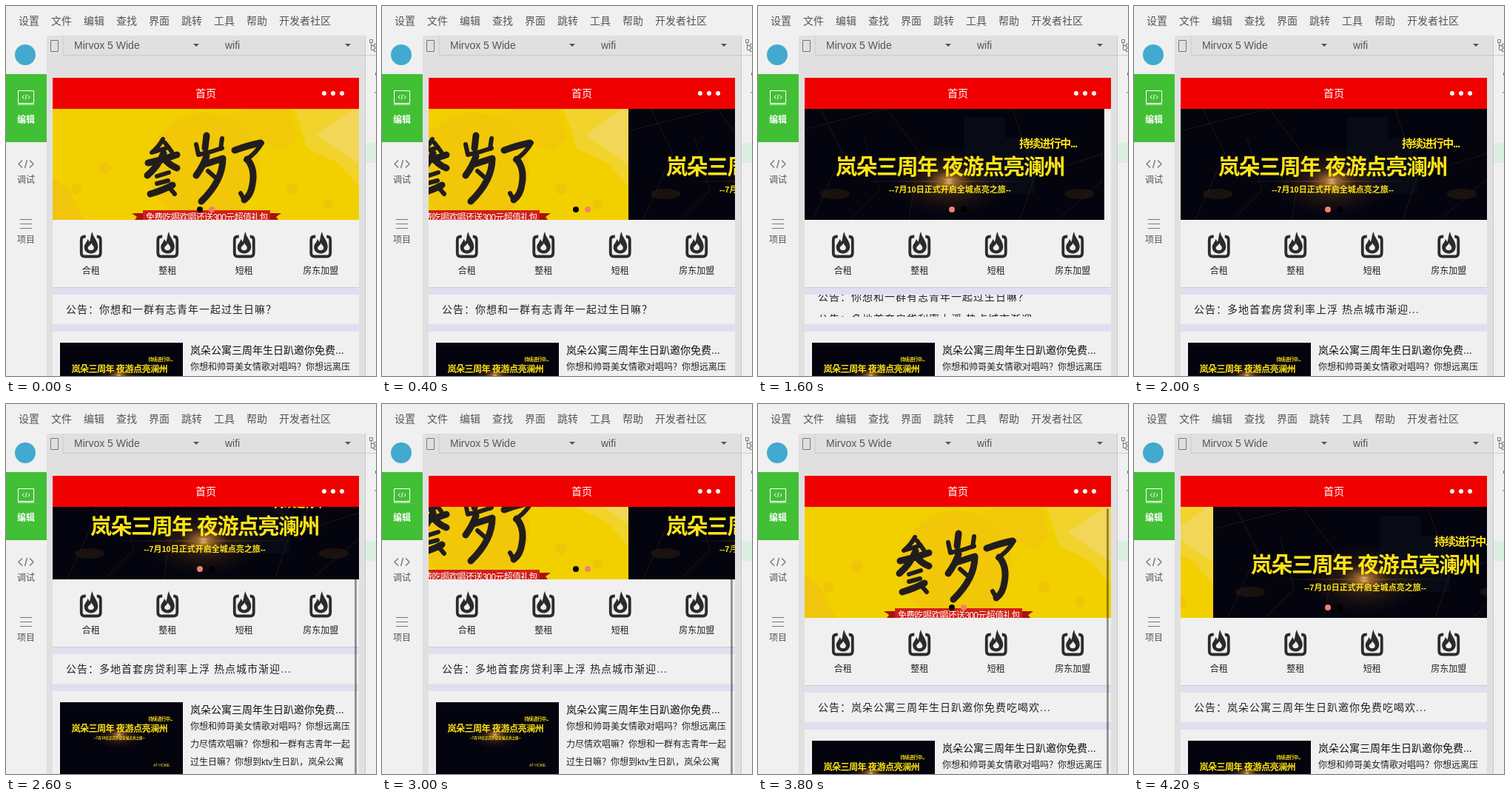
An HTML page that plays this animation: 500x500 px, repeating every 4.4 s.

```html
<!DOCTYPE html>
<html lang="zh">
<head>
<meta charset="utf-8">
<title>Preview</title>
<style>
  html, body { margin: 0; width: 100%; height: 100%; overflow: hidden; background: #f0f0f0; }
  svg { display: block; }
  text { font: 14px 'Liberation Sans', 'Noto Sans CJK SC', 'Noto Sans CJK', sans-serif; fill: #555; white-space: pre; }
  .small { font-size: 12px; }
  .mid { text-anchor: middle; }
  .white { fill: #fff; }
  .bold { font-weight: bold; }
  .dark text { fill: #222; }
  /* The TC face centres full-width punctuation */
  #notices text, #story text { font-family: 'Liberation Sans', 'Noto Sans CJK TC', 'Noto Sans CJK', sans-serif; }
  #notices text { letter-spacing: 1px; }
  #ad text { fill: #ffe414; font-weight: bold; }
  .line { fill: none; stroke: #777; }
  .brush { fill: none; stroke: #211d1c; stroke-linecap: round; stroke-linejoin: round; }
</style>
</head>
<body>
<svg id="stage" width="500" height="500" viewBox="0 0 500 500">
  <defs>
    <radialGradient id="glow">
      <stop offset="0" stop-color="#fff0b0"/>
      <stop offset=".1" stop-color="#d08a38" stop-opacity=".8"/>
      <stop offset=".4" stop-color="#6b421c" stop-opacity=".35"/>
      <stop offset="1" stop-color="#3a2410" stop-opacity="0"/>
    </radialGradient>
    <g id="ad">
      <ellipse cx="204" cy="98" rx="80" ry="48" fill="url(#glow)"/>
      <ellipse cx="204" cy="98" rx="130" ry="2" fill="url(#glow)"/>
      <text x="299" y="52" style="font-size:15px;letter-spacing:-1.2px">持续进行中...</text>
      <text x="51" y="89" style="font-size:29px;letter-spacing:-1.5px">岚朵三周年 夜游点亮澜州</text>
      <text x="123" y="113" style="font-size:11px">--7月10日正式开启全城点亮之旅--</text>
    </g>
    <g id="flame">
      <path d="M-7-12.500H-8Q-13-12.500-13-8V9.500Q-13 14.500-8 14.500H8Q13 14.500 13 9.500V-8Q13-12.500 8-12.500" fill="none" stroke="#2b2b2b" stroke-width="3.800"/>
      <path d="M2-19C2-12 10-7 9.500 2C9 8 4 10.500 0 10.500C-5 10.500-9.500 7-9 1C-8.500-3-5-5-4.500-9C-3-8-2.500-6-2-5C0-9-1-14 2-19Z" fill="#2b2b2b"/>
      <path d="M.5-4C1-1 4.500 0 4 3.500C3.500 7-3.500 7-4 3.500C-4.500 0 0 0 .5-4Z" fill="#f0f0f0"/>
    </g>
  </defs>

  <!-- editor chrome -->
  <path fill="#f0f0f0" d="M0 0h500v500H0z"/>
  <path fill="#e0e0e0" d="M55 40h430v460H55z"/>
  <path fill="#c8c8c8" d="M77 66h423v1H77zM485 40h1v460h-1z"/>
  <path fill="#d2d2d2" d="M77 40h1v26h-1z"/>
  <path fill="#dcefe0" d="M486 185h14v27h-14z"/>
  <g id="menu"></g>
  <path class="line" d="M60.500 46.500h10v15h-10zM491.500 45.500h4v4h-4zM493.500 50v9.500h4M493.500 53.500h4M497.500 51.500h3v4h-3zM497.500 57.500h3v4h-3zM499.500 90v4M498 117h2"/>
  <text x="92" y="58">Mirvox 5 Wide</text>
  <text x="296" y="58">wifi</text>
  <path fill="#555" d="M253 51h8l-4 4zM458 51h8l-4 4z"/>

  <!-- sidebar -->
  <circle cx="26" cy="66" r="14" fill="#42a9cf"/>
  <path fill="#41bf35" d="M0 92h55v92H0z"/>
  <path class="line" style="stroke:#fff" d="M16.500 114.500h21v17h-21zM16 133h22M24.500 120.500l-2.500 2.500 2.500 2.500M29.500 120.500l2.500 2.500-2.500 2.500M27.500 120l-1 6"/>
  <path class="line" stroke-width="1.400" d="M22 208.500l-5 5 5 5M32 208.500l5 5-5 5M28.500 208l-3 11"/>
  <path class="line" d="M19 288.500h16M19 294.500h16M19 300.500h16"/>
  <text class="small mid white bold" x="27" y="158">编辑</text>
  <text class="small mid" x="27" y="239">调试</text>
  <text class="small mid" x="27" y="320">项目</text>

  <!-- phone page -->
  <svg x="63" y="139" width="414" height="361">
    <path fill="#f0f0f0" d="M0 0h414v361H0z"/>
    <g id="page">
      <svg width="414" height="150">
        <g id="slides">
          <g>
            <path fill="#04040f" d="M0 0h414v150H0z"/>
            <path fill="none" stroke="#806030" opacity=".2" d="M0 30L70 12 120 0M30 0L60 60 20 150M70 150L110 110 90 40M290 0L320 90 414 60M320 90L300 150M350 150L414 95M120 0L165 60 150 150"/>
            <path fill="#14202c" opacity=".25" d="M225 12h55v28h40v75h-75V60h-20z"/>
            <ellipse cx="50" cy="115" rx="20" ry="7" fill="#302010" opacity=".5"/>
            <ellipse cx="380" cy="115" rx="20" ry="7" fill="#302010" opacity=".5"/>
            <use href="#ad"/>
          </g>
          <g transform="translate(-414)">
            <path fill="#f2d000" d="M0 0h414v150H0z"/>
            <path fill="#f1c909" d="M235 8l30-8h55l12 40-22 18-40-18z"/>
            <circle cx="205" cy="80" r="75" fill="#f1c708"/>
            <path fill="#f0bc18" opacity=".5" d="M0 92l22 18 20 40H0z"/>
            <path fill="#f2d32c" d="M327 0h87v105l-28-32-42-20z"/>
            <path fill="#f1d658" d="M356 35l50-35h8v75z"/>
            <g fill="#e8a818" opacity=".25">
              <circle cx="32" cy="108" r="7"/><circle cx="71" cy="80" r="8"/>
              <circle cx="323" cy="108" r="8"/><circle cx="372" cy="129" r="7"/>
            </g>
            <g class="brush" transform="translate(-63 -139)">
              <g stroke-width="9">
                <path d="M192 212Q212 208 231 201M213 199Q206 216 191 229M216 209Q223 216 231 219M195 254Q212 249 225 242"/>
                <path d="M271 175L269 192M271 203Q266 217 257 229M268 214L293 206Q293 236 264 264"/>
                <path d="M309 195Q328 188 344 185M326 207Q337 220 333 241Q331 256 322 262"/>
              </g>
              <g stroke-width="6">
                <path d="M212 180Q206 191 197 198L220 191M215 185l9 12M204 230l16-5M204 240l15-4M222 247l6 7"/>
                <path d="M257 187L260 201Q276 198 292 192M292 179L290 193M273 223l9 8"/>
                <path d="M346 185Q338 199 324 208M322 262L317 253"/>
              </g>
            </g>
            <path fill="#a8120e" d="M107 141h20v9h-16l3-4zM309 141h-20v9h16l-3-4z"/>
            <path fill="#d02018" d="M122 137h172v13H122z"/>
            <text class="white" x="126" y="151" style="font-size:12px;letter-spacing:-.7px">免费吃喝欢唱还送300元超值礼包</text>
          </g>
        </g>
        <circle id="dot0" cx="199" cy="136" r="4"/>
        <circle id="dot1" cx="215" cy="136" r="4"/>
      </svg>
      <g id="tabs" class="dark"></g>
      <path fill="#ccc" d="M0 241h414v1H0z"/>
      <path fill="#e0dff0" d="M0 242h414v9H0zM0 291h414v10H0z"/>
      <svg y="251" width="414" height="30"><g id="notices" class="dark"></g></svg>
      <svg x="10" y="316" width="166" height="124">
        <path fill="#04040f" d="M0 0h166v124H0z"/>
        <use href="#ad" transform="translate(-6 3) scale(.42)"/>
        <text x="126" y="87" style="font-size:5px;fill:#ffe414">AT HOME</text>
      </svg>
      <text x="186" y="331" style="fill:#111">岚朵公寓三周年生日趴邀你免费...</text>
      <g id="story" class="dark"></g>
    </g>
    <rect id="thumb" x="408" width="3" height="500" rx="1.500" fill="#000" opacity=".38"/>
  </svg>
  <path fill="#f00000" d="M63 97h414v42H63z"/>
  <text class="mid white" x="270" y="123">首页</text>
  <g fill="#fff"><circle cx="430" cy="118" r="3"/><circle cx="442" cy="118" r="3"/><circle cx="454" cy="118" r="3"/></g>
</svg>
<script>
const $ = id => document.getElementById(id);
const fill = (id, items, draw) => $(id).innerHTML = items.map(draw).join('');

fill('menu', ['设置', '文件', '编辑', '查找', '界面', '跳转', '工具', '帮助', '开发者社区'],
  (s, i) => `<text x="${17 + 44 * i}" y="25">${s}</text>`);
fill('tabs', ['合租', '整租', '短租', '房东加盟'], (s, i) => {
  const x = 51.75 + 103.5 * i;
  return `<use href="#flame" x="${x}" y="185"/><text class="small mid" x="${x}" y="222.5">${s}</text>`;
});
fill('notices', ['你想和一群有志青年一起过生日嘛？', '多地首套房贷利率上浮 热点城市渐迎...', '岚朵公寓三周年生日趴邀你免费吃喝欢...'],
  (s, i) => `<text x="18" y="${25 + 30 * i}">公告：${s}</text>`);
fill('story', ['你想和帅哥美女情歌对唱吗？你想远离压', '力尽情欢唱嘛？你想和一群有志青年一起', '过生日嘛？你想到ktv生日趴，岚朵公寓'],
  (s, i) => `<text class="small" x="186" y="${352.5 + 24 * i}">${s}</text>`);

// Stepped tracks: [start ms, value]
const LOOP = 4400;
const slideX = [[0, 414], [400, 270], [600, 44], [800, 0], [1200, -85], [1400, -43], [1600, -9], [1800, 0],
  [2800, 60], [3000, 270], [3200, 394], [3400, 414], [4000, 270], [4200, 44]];
const noticeY = [[0, 0], [1600, 17], [1800, 28], [2000, 30], [3600, 47], [3800, 60]];
const scrollY = [[0, 0], [2400, 24], [2600, 52], [3200, 12], [3400, 0]];
const valueAt = (track, t) => track.findLast(([start]) => start <= t)[1];
const move = (id, x, y) => $(id).setAttribute('transform', `translate(${x} ${y})`);

function render() {
  const t = performance.now() % LOOP;
  const x = valueAt(slideX, t), scroll = valueAt(scrollY, t);
  move('slides', x, 0);
  move('notices', 0, -valueAt(noticeY, t));
  move('page', 0, -scroll);
  const active = x > 207 ? 1 : 0;
  [0, 1].forEach(i => $('dot' + i).setAttribute('fill', i === active ? '#f08070' : '#000'));
  $('thumb').setAttribute('y', 2 + scroll * 0.94);
  $('thumb').setAttribute('visibility', t >= 2400 && t < 4000 ? 'visible' : 'hidden');
  requestAnimationFrame(render);
}
render();
</script>
</body>
</html>
```
